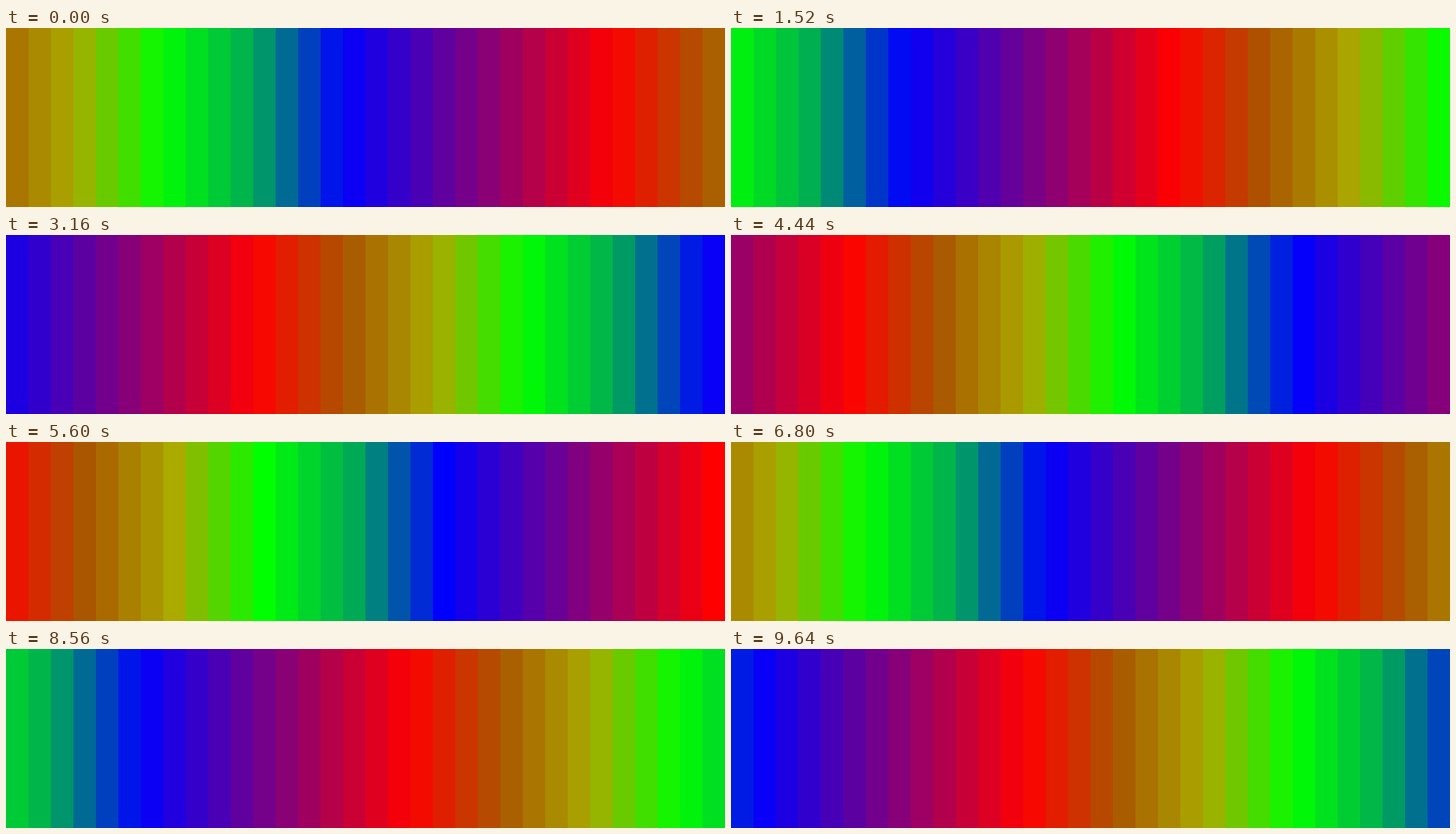
Animation, 1024 px wide and 256 px high, one loop 9.76 s. Source, as an HTML page with a canvas:

```html
<!DOCTYPE html>
<html lang="en">
<head>
<meta charset="utf-8">
<title>Rainbow strip</title>
<style>
  html, body { margin: 0; width: 100%; height: 100%; overflow: hidden; background: #000; }
  canvas { display: block; width: 100vw; height: 100vh; }
</style>
</head>
<body>
<canvas id="strip" width="1024" height="256"></canvas>
<script>
const LOOP = 9760, LAST = 9640, UPDATES = 88, TICK = 40;
const BARS = 32, BAR_W = 32, HEIGHT = 256, HUE_STEP = 8;

// Red, orange, yellow, green, aqua, blue, purple, pink: r, g, b in thirds
const WHEEL = ["300", "210", "220", "030", "021", "003", "102", "201"]
  .map(stop => [...stop].map(third => third * 85));

// Hue of the first bar, as [time, hue]; the wheel has 256 hues
const DRIFT = [[0, 44], [1520, 102], [3160, 171], [5600, 264], [LAST, 411]];

const lerp = (a, b, k) => a + (b - a) * k;

// Updates are evenly spaced, then snapped to the clock tick
const updateTime = n => Math.round(n * LAST / UPDATES / TICK) * TICK;

function lastUpdate(time) {
  let n = UPDATES;
  while (updateTime(n) > time) n--;
  return updateTime(n);
}

function hueAt(time) {
  const i = DRIFT.findIndex(([t]) => t >= time) || 1;
  const [t0, h0] = DRIFT[i - 1], [t1, h1] = DRIFT[i];
  return Math.round(lerp(h0, h1, (time - t0) / (t1 - t0)));
}

function colour(hue) {
  const pos = (hue % 256) / 32, i = Math.floor(pos);
  const next = WHEEL[(i + 1) % WHEEL.length];
  return `rgb(${WHEEL[i].map((c, n) => Math.round(lerp(c, next[n], pos - i)))})`;
}

const ctx = document.getElementById("strip").getContext("2d");
const start = performance.now();

function draw() {
  const time = (performance.now() - start) % LOOP;
  const hue = hueAt(lastUpdate(time));
  for (let i = 0; i < BARS; i++) {
    ctx.fillStyle = colour(hue + i * HUE_STEP);
    ctx.fillRect(i * BAR_W, 0, BAR_W, HEIGHT);
  }
  requestAnimationFrame(draw);
}
draw();
</script>
</body>
</html>
```
